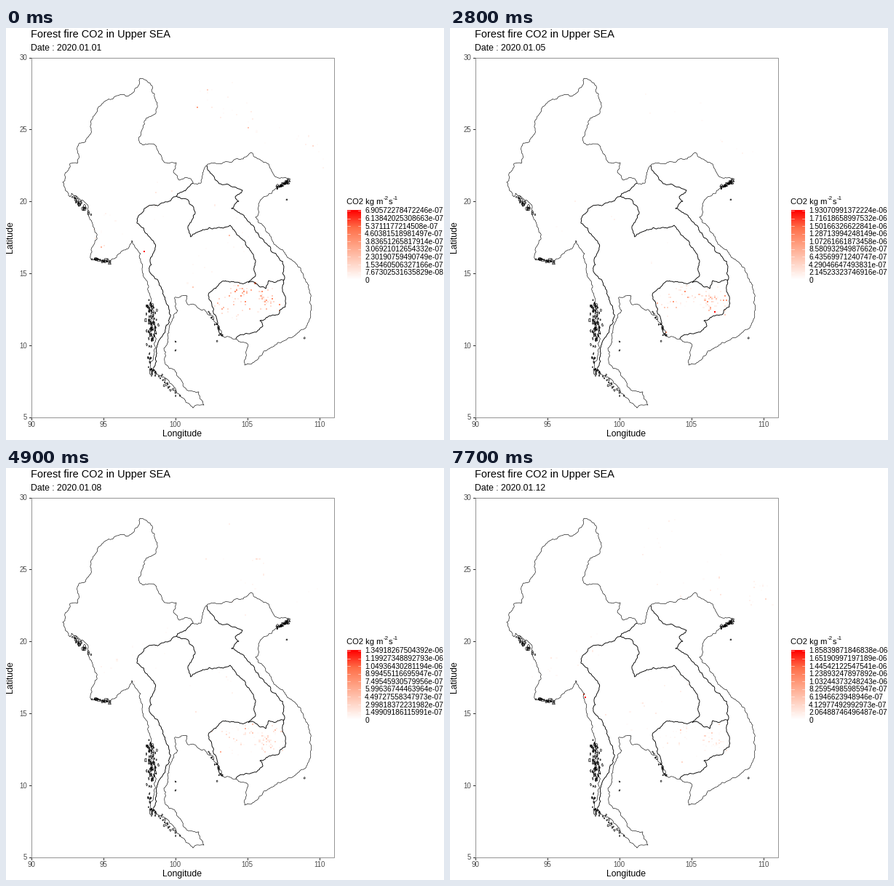
Recreate the animation shown at these times as a matplotlib script. Size 602x566 px, loop 8000 ms.

```python
import numpy as np
import matplotlib
import matplotlib.pyplot as plt
from matplotlib.animation import FuncAnimation
from matplotlib.collections import LineCollection
from matplotlib.colors import LinearSegmentedColormap

W, H, DPI = 602, 566, 100
PX = 72 / DPI
LEFT, RIGHT, TOP, BOTTOM = 34.5, 450.5, 40.5, 535
CELL = 1.98  # a tenth of a degree

matplotlib.rcParams["font.family"] = "Liberation Sans"
fig = plt.figure(figsize=(W / DPI, H / DPI), dpi=DPI, facecolor="white")
ax = fig.add_axes([0, 0, 1, 1])
ax.set_xlim(0, W)
ax.set_ylim(H, 0)
ax.axis("off")
rng = np.random.default_rng(12)
heat = LinearSegmentedColormap.from_list(
    "heat", ["#ffffff", "#ffd1c1", "#ffa183", "#ff6e48", "#ff0000"])


def label(x, y, s, size, color="black", **kw):
    return ax.text(x, y, s, fontsize=size * PX, color=color, **kw)


def rough(points, amp=0.18, step=2.2):
    """Break a polyline into a jagged one by midpoint displacement."""
    pts = [np.array(p, float) for p in points]
    out = [pts[0]]

    def split(a, b):
        d = b - a
        n = np.hypot(*d)
        if n < step:
            out.append(b)
            return
        shift = rng.uniform(-1, 1) * min(amp, 2.5 / n)
        mid = (a + b) / 2 + np.array([-d[1], d[0]]) * shift
        split(a, mid)
        split(mid, b)

    for a, b in zip(pts, pts[1:]):
        split(a, b)
    return np.array(out)


def isle(x, y, w, h):
    t = np.linspace(0, 2 * np.pi, 9)
    r = rng.uniform(0.4, 1.2, 9)
    r[-1] = r[0]
    return np.column_stack([x + w * r * np.cos(t), y + h * r * np.sin(t)])


def chain(a, b, n, spread, w, h):
    """Scatter n islets along the segment from a to b."""
    a, b = np.array(a, float), np.array(b, float)
    for k in rng.uniform(0.4, 1.3, n):
        x, y = a + (b - a) * rng.random() + rng.normal(0, spread, 2)
        yield isle(x, y, w * k, h * k)


def strokes(lines, width):
    ax.add_collection(LineCollection(lines, colors="black",
                                     linewidths=width * PX, zorder=3))


# Outer borders and coasts
west = [(184, 69), (181, 81), (166, 94), (153, 93), (137, 100), (117, 132),
        (117, 140), (108, 157), (101, 158), (98, 186), (88, 186), (78, 212),
        (88, 232)]
bay = [(88, 232), (90, 227), (113, 245), (112, 256), (122, 280), (125, 290),
       (118, 308), (118, 319), (138, 321), (152, 315), (173, 292), (185, 310),
       (187, 330), (195, 360), (203, 388), (205, 440), (198, 468)]
isthmus = [(198, 468), (200, 479), (204, 470), (225, 488), (257, 522),
           (272, 518), (265, 500), (248, 497), (232, 470), (219, 462),
           (217, 440), (224, 415), (236, 388), (232, 370), (249, 368),
           (250, 380), (273, 387), (290, 406), (296, 423), (316, 427)]
east = [(316, 427), (332, 434), (328, 463), (342, 458), (354, 444), (395, 424),
        (414, 408), (419, 380), (414, 350), (405, 330), (365, 290), (343, 260),
        (347, 242), (370, 221), (391, 208)]
north = [(391, 208), (372, 205), (361, 187), (348, 180), (337, 171), (326, 180),
         (297, 186), (276, 189), (270, 199), (268, 213), (257, 213)]
hills = [(184, 69), (201, 80), (200, 86), (208, 109), (206, 117), (190, 128),
         (184, 158), (204, 160), (218, 185), (234, 185), (230, 198), (238, 209),
         (254, 207), (257, 213)]
strokes([rough(p) for p in (west, bay, isthmus, east, north, hills)], 0.6)

# Borders shared by two countries
salween = [(257, 213), (234, 231), (209, 244), (190, 248), (180, 268),
           (195, 285), (205, 297), (198, 318), (197, 332), (209, 347),
           (226, 394), (209, 432), (203, 466), (199, 473)]
mekong = [(234, 231), (250, 236), (260, 253), (250, 275), (254, 287),
          (270, 277), (308, 271), (329, 297), (343, 320), (343, 340), (333, 350)]
plain = [(382, 346), (361, 347), (357, 358), (341, 349), (296, 349), (279, 364),
         (283, 381), (296, 423)]
ridge = [(276, 189), (293, 214), (325, 223), (315, 232), (320, 238), (310, 248),
         (335, 267), (364, 306), (382, 328), (382, 346)]
delta = [(382, 346), (384, 383), (373, 394), (349, 402), (353, 409), (338, 419),
         (316, 427)]
strokes([rough(p) for p in (salween, mekong, plain, ridge, delta)], 0.9)

islets = [
    *chain((93, 232), (117, 260), 24, 1.8, 1.6, 2.2),
    *chain((119, 317), (143, 321), 20, 1.4, 2.2, 1.4),
    *chain((198, 378), (201, 432), 75, 3.6, 1.1, 2.4),
    *chain((195, 432), (199, 474), 12, 1.6, 0.7, 1.6),
    *chain((200, 470), (238, 505), 26, 2.2, 1.2, 1.6),
    *chain((370, 221), (389, 210), 40, 1.3, 1.5, 1.1),
    *chain((276, 387), (297, 424), 16, 1.5, 0.9, 1.2),
]
for x, y in [(233, 431), (233, 443), (386, 236), (410, 426), (290, 430)]:
    islets.append(isle(x, y, 1.1, 1.3))
strokes(islets, 0.65)

# Panel, axes and titles
ax.add_patch(plt.Rectangle((LEFT, TOP), RIGHT - LEFT, BOTTOM - TOP, fill=False,
                           ec="#8a8a8a", lw=0.9 * PX, zorder=4))
GREY = "#4d4d4d"
for i in range(6):
    x, y = LEFT + 99.1 * i, BOTTOM - 98.9 * i
    ax.plot([LEFT - 3, LEFT], [y, y], color="#333333", lw=PX)
    label(29, y + 3.5, 5 + 5 * i, 9.7, GREY, ha="right")
    if x < RIGHT:
        ax.plot([x, x], [BOTTOM, BOTTOM + 3], color="#333333", lw=PX)
        label(x, 547.5, 90 + 5 * i, 9.7, GREY, ha="center")
label(242.5, 561.5, "Longitude", 12.2, ha="center")
label(12, 287.5, "Latitude", 12.2, ha="right", va="center", rotation=90)
label(LEFT, 13, "Forest fire CO2 in Upper SEA", 14.5)
date = label(LEFT, 31, "", 12.2)

# Legend
label(468.5, 241.5, "CO2 kg m", 11.1)
label(518.6, 236.5, "-2", 8)
label(526, 241.5, "s", 11.1)
label(531.8, 236.5, "-1", 8)
ax.imshow(np.linspace(1, 0, 96)[:, None], cmap=heat, vmin=0, vmax=1,
          extent=(469, 488, 346.5, 250.5), aspect="auto", zorder=2)
scale = []
for k in range(10):
    y = 251 + 10.58 * k
    for x in (469, 484.2):
        ax.plot([x, x + 3.8], [y, y], color="white", lw=0.5 * PX, zorder=3)
    scale.append(label(493.3, y + 3.5, "", 10.1))

# Per day: scale maximum, fires in the hot plain, their strength, fires elsewhere
days = [
    (6.90572278472246e-07, 110, 0.22, 75),
    (1.25459996525024e-06, 58, 0.12, 14),
    (8.21340956120431e-07, 75, 0.16, 30),
    (6.61647789002018e-07, 55, 0.20, 28),
    (1.93070991372224e-06, 105, 0.16, 22),
    (1.10265834927713e-06, 85, 0.15, 35),
    (9.97895085674827e-07, 95, 0.17, 55),
    (1.34918267504392e-06, 90, 0.14, 40),
    (9.40046049890952e-07, 110, 0.22, 50),
    (8.76431520917346e-07, 85, 0.17, 45),
    (1.47250361829054e-06, 70, 0.12, 45),
    (1.85839871846838e-06, 60, 0.07, 70),
]

# Notable fires by day: x, y, share of the maximum
spots = {
    0: [(190, 306, 1), (130, 301, .4), (264, 108, .5), (306, 286, .35),
        (317, 360, .6), (297, 387, .45), (277, 85, .25), (258, 356, .3)],
    1: [(362, 377, 1), (354, 362, .5), (372, 370, .4)],
    3: [(325, 353, 1), (265, 108, .5), (284, 365, .6), (358, 364, .75),
        (341, 361, .4)],
    4: [(364, 390, 1), (297, 418, .6), (355, 377, .6), (376, 374, .5)],
    6: [(369, 368, 1), (318, 359, .4), (357, 363, .5), (365, 382, .4)],
    8: [(377, 370, 1), (430, 196, 1), (354, 375, .7), (348, 382, .6),
        (271, 104, .5), (354, 152, .5), (377, 148, .35), (329, 257, .3),
        (293, 368, .35)],
    11: [(185, 310, .8), (186, 314, 1), (317, 360, .3), (361, 365, .25)],
}

# Centre and spread of the burning areas
HOT = [(362, 376, 9), (362, 373, 8), (324, 361, 9), (308, 376, 13)]
FAINT = [(138, 272, 12), (195, 250, 16), (308, 285, 17), (255, 325, 22),
         (290, 105, 20), (345, 150, 22), (420, 170, 12)]


def burn(areas, n, strength, gen):
    x, y, spread = gen.choice(areas, n).T
    val = np.clip(gen.exponential(strength, n), 0.02, 0.6)
    return np.column_stack([gen.normal(x, spread), gen.normal(y, spread), val])


def fires(day):
    _, n_hot, strength, n_far = days[day]
    gen = np.random.default_rng(100 + day)
    hot = burn(HOT, n_hot, strength, gen)
    hot = hot[(hot[:, 0] > 283) & (hot[:, 0] < 382)
              & (hot[:, 1] > 351) & (hot[:, 1] < 404)]
    far = burn(FAINT, n_far, 0.045, gen)
    far = far[far[:, 0] < RIGHT - 3]
    cells = np.vstack([far, hot, spots.get(day, hot[:1])])
    cells[:, :2] = np.round(cells[:, :2] / CELL) * CELL
    return cells


plots = [fires(d) for d in range(len(days))]
dots = ax.scatter([], [], c=[], s=(2.1 * PX) ** 2, marker="s", linewidths=0,
                  cmap=heat, vmin=0, vmax=1, zorder=2)


def update(i):
    day = i // 7
    dots.set_offsets(plots[day][:, :2])
    dots.set_array(plots[day][:, 2])
    date.set_text(f"Date : 2020.01.{day + 1:02d}")
    top = days[day][0]
    for k, t in enumerate(scale):
        t.set_text(f"{top * (9 - k) / 9:.15g}")
    return [dots, date, *scale]


anim = FuncAnimation(fig, update, frames=80, interval=100, repeat=True,
                     repeat_delay=0, blit=False)
plt.show()
```
